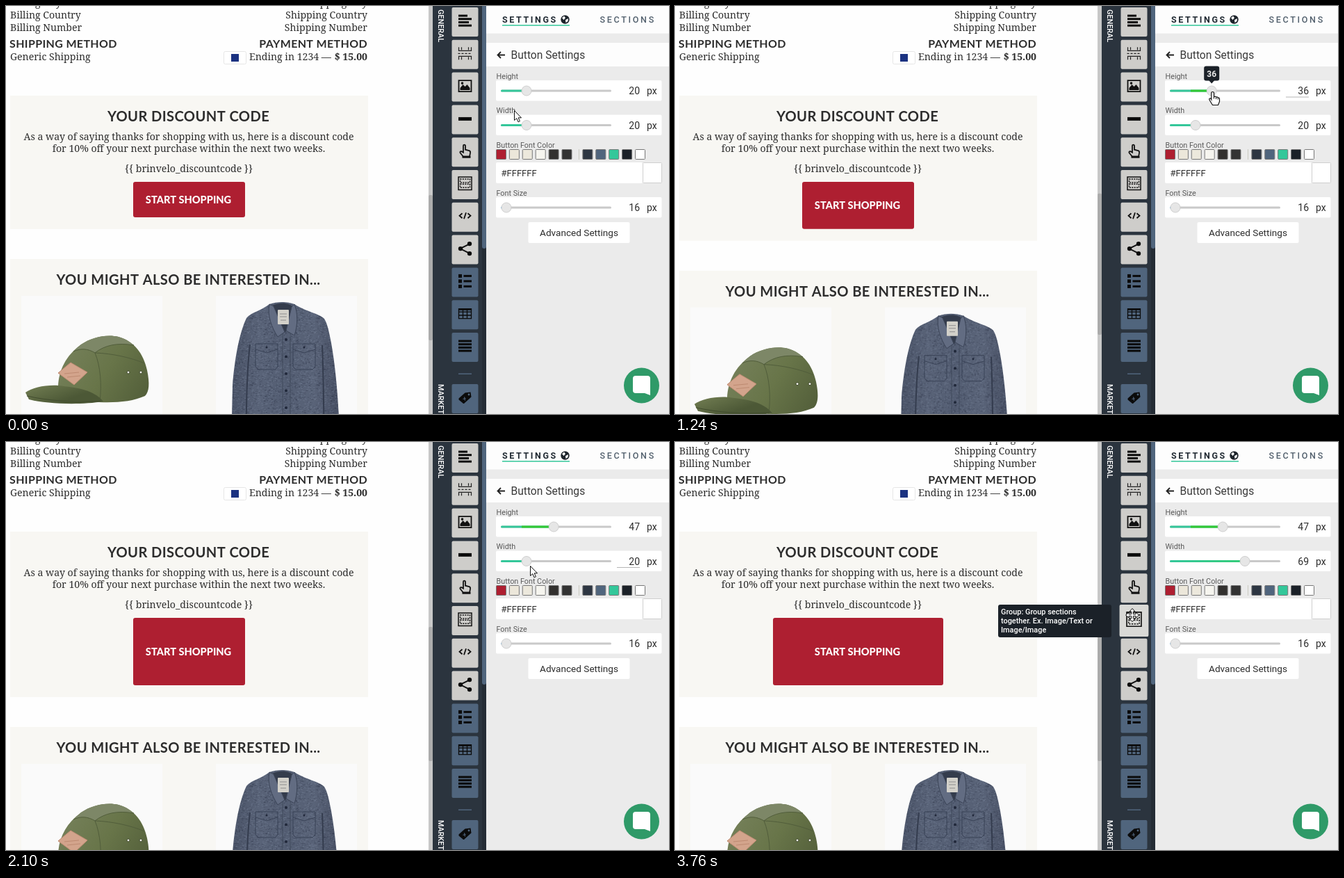
Recreate the animation shown at these times as an HTML page with a canvas. Size 954x587 px, loop 3910 ms.

```html
<!DOCTYPE html>
<html lang="en">
<head>
<meta charset="utf-8">
<title>Button settings</title>
<style>
  html, body { margin: 0; width: 100%; height: 100%; overflow: hidden; background: #fefefe; }
  canvas { display: block; }
</style>
</head>
<body>
<canvas id="stage" width="954" height="587"></canvas>
<script>
const ctx = document.getElementById('stage').getContext('2d');
const LOOP = 3910;
const SERIF = '"Noto Serif", serif', LATO = 'Lato, sans-serif', UI = 'Roboto, sans-serif';
const INK = '#2d2d2d', TEAL = '#34c79a', NAVY = '#2b343e', STEEL = '#50657d', NIGHT = '#1b2128';

// The picture only changes at these moments: [first, last, steps].
const STEPS = [[0, 0, 1], [80, 380, 5], [550, 630, 2], [790, 1240, 7], [1320, 1780, 7], [1850, 1940, 2],
  [2100, 2580, 7], [2650, 3110, 7], [3190, 3670, 7], [3760, 3760, 1]]
  .flatMap(([a, b, n]) => Array.from({ length: n },
    (_, i) => Math.floor((a + (n > 1 ? (b - a) * i / (n - 1) : 0)) / 10) * 10));

// Tracks of [time, value].
const HEIGHT = [[790, 20], [1010, 26], [1470, 46], [1550, 47]];
const WIDTH = [[2380, 20], [2530, 25], [2730, 37], [3110, 67], [3190, 69]];
const BTN_H = [[860, 51], [1010, 52.5], [1160, 61], [1470, 87], [1620, 95], [1700, 97]];
const BTN_W = [[2500, 161], [2580, 162.5], [2730, 169], [3110, 228], [3350, 240], [3510, 245]];
const CURSOR = [[0, 731, 150], [155, 738, 158], [380, 752, 124], [790, 752, 124], [1010, 760, 125],
  [1470, 787, 122], [1620, 788, 123], [1780, 776, 140], [1940, 754, 178], [2300, 754, 178],
  [2730, 778, 185], [3110, 820, 186], [3190, 823, 187], [3350, 819, 196], [3670, 651, 240]];

function track(keys, t, col = 1) {
  if (t <= keys[0][0]) return keys[0][col];
  for (let i = 1; i < keys.length; i++) {
    const a = keys[i - 1], b = keys[i];
    if (t <= b[0]) return a[col] + (b[col] - a[col]) * (t - a[0]) / (b[0] - a[0]);
  }
  return keys[keys.length - 1][col];
}

function rect(x, y, w, h, fill, r = 0, stroke) {
  ctx.beginPath();
  ctx.roundRect(x, y, w, h, r);
  if (fill) { ctx.fillStyle = fill; ctx.fill(); }
  if (stroke) { ctx.strokeStyle = stroke; ctx.lineWidth = 1; ctx.stroke(); }
}

function circle(x, y, r, fill, stroke) {
  ctx.beginPath();
  ctx.arc(x, y, r, 0, 7);
  ctx.fillStyle = fill;
  ctx.fill();
  if (stroke) { ctx.strokeStyle = stroke; ctx.lineWidth = 1; ctx.stroke(); }
}

function path(d, fill, stroke, width = 1) {
  const p = new Path2D(d);
  if (fill) { ctx.fillStyle = fill; ctx.fill(p); }
  if (stroke) { ctx.strokeStyle = stroke; ctx.lineWidth = width; ctx.stroke(p); }
}

function text(str, x, y, font, fill = INK, align = 'left', spacing = 0) {
  ctx.font = font;
  ctx.letterSpacing = spacing + 'px';
  ctx.textAlign = align;
  ctx.fillStyle = fill;
  ctx.fillText(str, x, y);
}

function at(x, y, draw, scale = 1) {
  ctx.save();
  ctx.translate(x, y);
  ctx.scale(scale, scale);
  draw();
  ctx.restore();
}

function gradient(x0, y0, x1, y1, ...colors) {
  const g = ctx.createLinearGradient(x0, y0, x1, y1);
  colors.forEach((c, i) => g.addColorStop(i / (colors.length - 1), c));
  return g;
}

// Woven cloth: short seeded flecks, light and dark.
const weave = (() => {
  const tile = document.createElement('canvas');
  tile.width = tile.height = 96;
  const c = tile.getContext('2d');
  let seed = 7;
  const rnd = () => (seed = seed * 16807 % 2147483647) / 2147483647;
  for (let i = 0; i < 1400; i++) {
    c.fillStyle = rnd() < .5 ? 'rgba(150,162,185,.22)' : 'rgba(25,30,45,.22)';
    c.fillRect(rnd() * 96, rnd() * 96, 1 + rnd() * 2, 1);
  }
  return ctx.createPattern(tile, 'repeat');
})();

function cap() {
  path('M75 547C76 524 86 503 108 487C124 476 146 472 162 476C184 482 198 500 203 524C207 543 206 555 200 561C182 569 160 571 134 570Z',
    gradient(85, 490, 200, 565, '#75805a', '#687549', '#535f3a'));
  path('M108 487C124 476 146 472 162 476C172 479 178 483 184 488C160 484 142 488 128 499C118 493 108 492 97 497Z', '#7d8767');
  path('M97 497C108 492 118 493 128 499C136 518 138 546 135 568M128 499C142 488 160 484 184 488M128 499C154 500 180 506 199 514',
    null, '#515d3b');
  path('M28 556C38 549 56 545 75 546C102 549 126 552 140 569C108 574 60 573 33 566Z',
    gradient(60, 545, 70, 573, '#69754c', '#4c5836'));
  path('M30 561C60 568 100 571 136 568', null, '#414c2e');
  path('M75 528L93 513L117 527L98 545Z', '#d3a48c', '#c08d74');
  path('M84 529L105 527M88 534L107 532', null, '#bd8a71');
  for (const x of [176, 194]) circle(x, 527, 2, '#f4f3ec', '#3f4a2d');
}

function shirt() {
  const body = 'M379 429C368 438 352 441 346 449C335 472 329 510 326 545L324 640H481C479 580 476 530 468 485C465 470 463 458 458 450C450 442 432 440 415 429C405 425 390 425 379 429Z';
  path(body, gradient(325, 0, 480, 0, '#4a5367', '#596378', '#535d72', '#5a6479', '#474f63'));
  path(body, weave);
  path('M351 487C346 530 346 580 345 640M455 488C457 530 457 580 458 640', null, '#343c4e', 2);
  path('M398 468V640M409 466V640', null, '#414a5d');
  path('M383 431C393 426 407 427 412 432L409 460L401 470Z', '#343c4c');
  path('M379 429L385 432L401 469L391 476C382 462 376 446 379 429ZM415 429L411 433L403 467L415 474C420 458 420 442 415 429Z',
    '#626c82', '#3c4558');
  rect(391, 437, 16, 21, '#d3d1ca', 1);
  path('M394 443H404M394 447H404M395 452H403', null, '#8d8d8d');
  for (const x of [359, 413]) {
    path(`M${x} 486h32v33l-4 4h-24l-4-4ZM${x} 494l16 5l16-5`, null, '#394256');
    circle(x + 16, 491, 1.5, '#20283a');
  }
  for (let y = 480; y < 640; y += 24.5) circle(403, y, 2, '#20283a');
}

function email(t) {
  const body = '14.1px ' + SERIF, head = 'bold 20.1px ' + LATO, sub = 'bold 16px ' + LATO;
  const h = track(BTN_H, t), w = track(BTN_W, t), shift = h - 51;
  rect(0, 0, 608, 587, '#fefefe');
  ['City', 'Country', 'Number'].forEach((s, i) => {
    text('Billing ' + s, 6, i * 18, body);
    text('Shipping ' + s, 520, i * 18, body, INK, 'right');
  });
  text('SHIPPING METHOD', 5, 59.5, sub, INK, 'left', .35);
  text('PAYMENT METHOD', 520, 59.5, sub, INK, 'right', .35);
  text('Generic Shipping', 6, 78, body);
  rect(313.5, 65.5, 32, 18, '#fff', 2, '#e6e6e6');
  rect(324, 69, 11, 11, '#1b3281');
  text('Ending in 1234 —', 350, 78, body);
  text('$ 15.00', 520, 78, 'bold ' + body, INK, 'right');

  rect(6, 129, 515, 192 + shift, '#f8f7f3');
  text('YOUR DISCOUNT CODE', 262.5, 166, head, INK, 'center', .4);
  text('As a way of saying thanks for shopping with us, here is a discount code', 263, 193, body, INK, 'center');
  text('for 10% off your next purchase within the next two weeks.', 263, 210, body, INK, 'center');
  text('{{ brinvelo_discountcode }}', 263, 239, body, INK, 'center');
  rect(263.5 - w / 2, 253, w, h, '#ae1f31', 3);
  text('START SHOPPING', 262.5, 258.5 + h / 2, '800 14.6px ' + LATO, '#fff', 'center');

  at(0, shift, () => {
    rect(6, 364, 515, 300, '#f8f7f3');
    rect(22, 417, 203, 200, '#fafafa');
    rect(302, 417, 203, 200, '#fafafa');
    text('YOU MIGHT ALSO BE INTERESTED IN...', 262.5, 401, head, INK, 'center', .4);
    cap();
    shirt();
  });

  rect(608, 0, 6, 587, '#c8c8c8');
  rect(608, 272 - shift * .13, 6, 209 - shift * .35, '#acacac', 2);
}

// Toolbar icons, drawn around (0, 0) in a 19 px box.
const bars = (rows, x, w, h = 3) => rows.forEach((y, i) => rect(x, y, w[i % w.length], h, '#0b0b0b'));
const hand = 'M-2.5 2V-7.5Q-2.5-9-1-9T.5-7.5V-2L6-.5Q8 0 7.5 3L6.5 8H-2.5L-7 2.5Q-7.5 0-5 .5Z';
const ICONS = [
  () => bars([-9, -4.3, .4, 5.1], -9.5, [13, 19, 15, 19]),
  () => {
    path('M-9-9V-4H9V-9M-9 9V4H9V9M-5-9V-5M5-9V-5M-5 9V5M5 9V5', null, '#222', 1.2);
    ctx.setLineDash([3, 2]);
    path('M-10 0H10', null, '#222', 1.2);
    ctx.setLineDash([]);
  },
  () => {
    path('M-9-8H9V8H-9Z', null, '#111', 1.8);
    path('M-7 6V3L-3-2L0 1L3-2L7 3V6Z', '#111');
    circle(-4, -4, 1.8, '#111');
  },
  () => rect(-9.5, -2, 19, 5, '#0b0b0b'),
  () => {
    path(hand, null, '#111', 1.8);
    rect(-4, 7, 12, 3, '#111');
  },
  () => {
    path('M-9.5-9.5H9.5V9H-9.5Z', null, '#111', 1.5);
    for (const y of [-6.5, .8]) {
      ctx.setLineDash([2, 1.4]);
      path(`M-7 ${y}H7V${y + 5}H-7Z`, null, '#111', 1.4);
    }
    ctx.setLineDash([]);
  },
  () => path('M-4-4L-8-.5L-4 3M4-4L8-.5L4 3M1.5-5L-1.5 4', null, '#111', 1.8),
  () => {
    path('M7-7L-7 0L7 7', null, '#111', 2);
    for (const [x, y] of [[6.5, -7], [-6.5, 0], [6.5, 7]]) circle(x, y, 3.2, '#0b0b0b');
  },
  () => {
    bars([-10, -2.5, 5], -9.5, [5], 5);
    bars([-9, -1.5, 6], -2, [11.5]);
  },
  () => {
    path('M-9-7H9V7H-9ZM-9-2.5H9M-9 2.3H9M-3-7V7M3-7V7', null, '#0b0b0b', 1.3);
    rect(-9, -7.5, 18, 2.5, '#0b0b0b');
  },
  () => bars([-9, -4.3, .4, 5.1], -9.5, [19]),
  () => {
    path('M-9 1L0-7L8-8L9-1L-1 8Q-2 9-3 8L-9 3Z', '#0b0b0b');
    circle(5.5, -4.5, 1.4, STEEL);
    path('M-3 2L1 1M-1-1L0 4', null, STEEL, 1.2);
  }
];

function toolbar(t) {
  rect(614, 0, 77, 587, NAVY);
  rect(685, 0, 6, 587, '#242c35');
  rect(685, -4, 6, 353, STEEL, 3);
  [['GENERAL', 5], ['MARKETING', 544]].forEach(([label, y]) => at(621.5, y, () => {
    ctx.rotate(Math.PI / 2);
    text(label, 0, 0, '500 10.8px ' + UI, '#fff');
  }));
  ICONS.forEach((icon, i) => {
    const y = (i === 11 ? 544 : 2 + i * 46.8) + 21;
    const hover = i === 5 && t >= 3670;
    at(660.5, y, () => {
      rect(-19, -21, 38, 42, i < 8 ? (hover ? '#d9d9d6' : '#cecdca') : STEEL, 2);
      at(0, -1.5, icon);
    }, hover ? 1.1 : 1);
  });
  rect(651, 528.5, 19, 1.5, STEEL);
  if (t >= 3670) {
    rect(465, 234, 163, 47, NIGHT, 3);
    ['Group: Group sections', 'together. Ex. Image/Text or', 'Image/Image']
      .forEach((line, i) => text(line, 469, 248 + i * 13, '500 10.9px ' + UI, '#fff'));
  }
}

function slider(label, y, value, opts = {}) {
  const x = opts.x || 720 + value * 1.45;
  text(label, 705.5, y - 17.5, '10.8px ' + UI, '#5a5a5a');
  rect(705, y - 15, 238.5, 29.5, '#fff', 2);
  rect(712, y - 1.5, 159, 3, '#c9c9c9', 1.5);
  rect(712, y - 1.5, x - 712, 3, opts.fill || TEAL, 1.5);
  if (opts.lit) rect(742, y - 1.5, x - 742, 3, opts.lit);
  circle(x, y, 7, '#e6e6e6', '#cfcfcf');
  text(value, 912, y + 5, '14px ' + UI, INK, 'right');
  text('px', 922, y + 5, '14px ' + UI);
  if (opts.hover) rect(879, y + 8.5, 33, 1, '#b5b5b5');
  if (opts.tip) {
    rect(x - 11, y - 35.5, 22, 21, NIGHT, 3);
    path(`M${x - 4} ${y - 15}h8l-4 4.5Z`, NIGHT);
    text(value, x, y - 20.5, 'bold 12px ' + UI, '#e8e8e8', 'center');
  }
}

function panel(t, cursorY) {
  rect(691, 0, 263, 587, '#ebebeb');
  rect(691, 0, 263, 39.5, '#fdfdfd');
  text('SETTINGS', 714, 24, 'bold 12.5px ' + UI, '#222b34', 'left', 2.6);
  rect(714, 27, 97, 1.6, TEAL);
  circle(804.5, 19.5, 6.2, '#1d242b');
  path('M800 17L803 14.5L805 17L802.5 20ZM805 20L809 18L808.5 22L805.5 24Z', '#fff');
  text('SECTIONS', 854.5, 24, '500 12.5px ' + UI, '#53616e', 'left', 2.7);

  rect(691, 53, 263, 34, '#fdfdfd');
  path('M718 70.5H707.5M712 66L707.5 70.5L712 75', null, '#222', 1.8);
  text('Button Settings', 726.5, 75.5, '15.6px ' + UI, '#3a3a3a');

  const h = Math.round(track(HEIGHT, t)), w = Math.round(track(WIDTH, t));
  slider('Width', 171.5, w, {
    hover: cursorY >= 157 && cursorY <= 187,
    tip: t >= 2340 && t < 3400,
    fill: w > 20 ? gradient(712, 0, 820, 0, TEAL, '#33cc78') : TEAL
  });
  slider('Height', 122, h, {
    hover: cursorY >= 107 && cursorY <= 137,
    tip: t >= 790 && t < 1700,
    lit: h > 20 && '#35c935'
  });

  text('Button Font Color', 705.5, 204, '10.8px ' + UI, '#5a5a5a');
  ['#ae1f31', '#ece7da', '#ece8dc', '#f6f5ef', '#33312f', '#333333',
    '#2d3642', STEEL, TEAL, NIGHT, '#ffffff'].forEach((c, i) =>
    rect(705.5 + i * 18.9 + (i > 5 ? 11 : 0), 206.5, 14, 14, c, 1, '#777'));
  rect(824, 206, 1, 15, '#c9cbc0');
  rect(705, 225, 211, 30, '#fff', 2);
  text('#FFFFFF', 712.5, 245, '13px ' + UI);
  rect(916.5, 225.5, 27, 29, '#fff', 1, '#cfcfcf');
  slider('Font Size', 290, 16, { x: 720, fill: '#8fc4e8' });
  rect(751.5, 311, 146, 30, '#fff', 2);
  text('Advanced Settings', 824.5, 331, '13.6px ' + UI, INK, 'center');

  circle(914.5, 546, 25.5, '#2f9a68');
  path('M906 532H923Q927 532 927 536V560L919 557H906Q902 557 902 553V536Q902 532 906 532Z', '#fff');
}

function cursor(t, x, y) {
  if (t >= 3760) {
    at(658, 249, () => path('M0-9.5L4-5H1.3V-1.3H5V-4L9.5 0L5 4V1.3H1.3V5H4L0 9.5L-4 5H-1.3V1.3H-5V4L-9.5 0L-5-4V-1.3H-1.3V-5H-4Z',
      '#fff', '#111'));
  } else if (t >= 550 && t < 1700) {
    at(x, y, () => {
      path('M0 0Q2 0 2 2V7Q4 6 5 7.5Q7 7 7.7 8.5Q10 8 10 10.5V14L8 19H0L-4 12.5Q-5.5 10-4 9.5T-1.7 11V2Q-1.7 0 0 0Z',
        '#fff', '#111', 1.2);
      path('M2 7V10M5 8V10.5M7.7 9V11', null, '#111');
    });
  } else {
    at(x, y, () => path('M.5.5V14.5L3.8 11.6L6 16.8L8.4 15.8L6.2 10.8H10.5Z', '#fff', '#111'));
  }
}

function render(t) {
  const x = track(CURSOR, t, 1), y = track(CURSOR, t, 2);
  email(t);
  toolbar(t);
  panel(t, y);
  cursor(t, x, y);
}

function tick() {
  const now = performance.now() % LOOP;
  render(STEPS.filter(s => s <= now).pop());
  requestAnimationFrame(tick);
}
tick();
</script>
</body>
</html>
```
